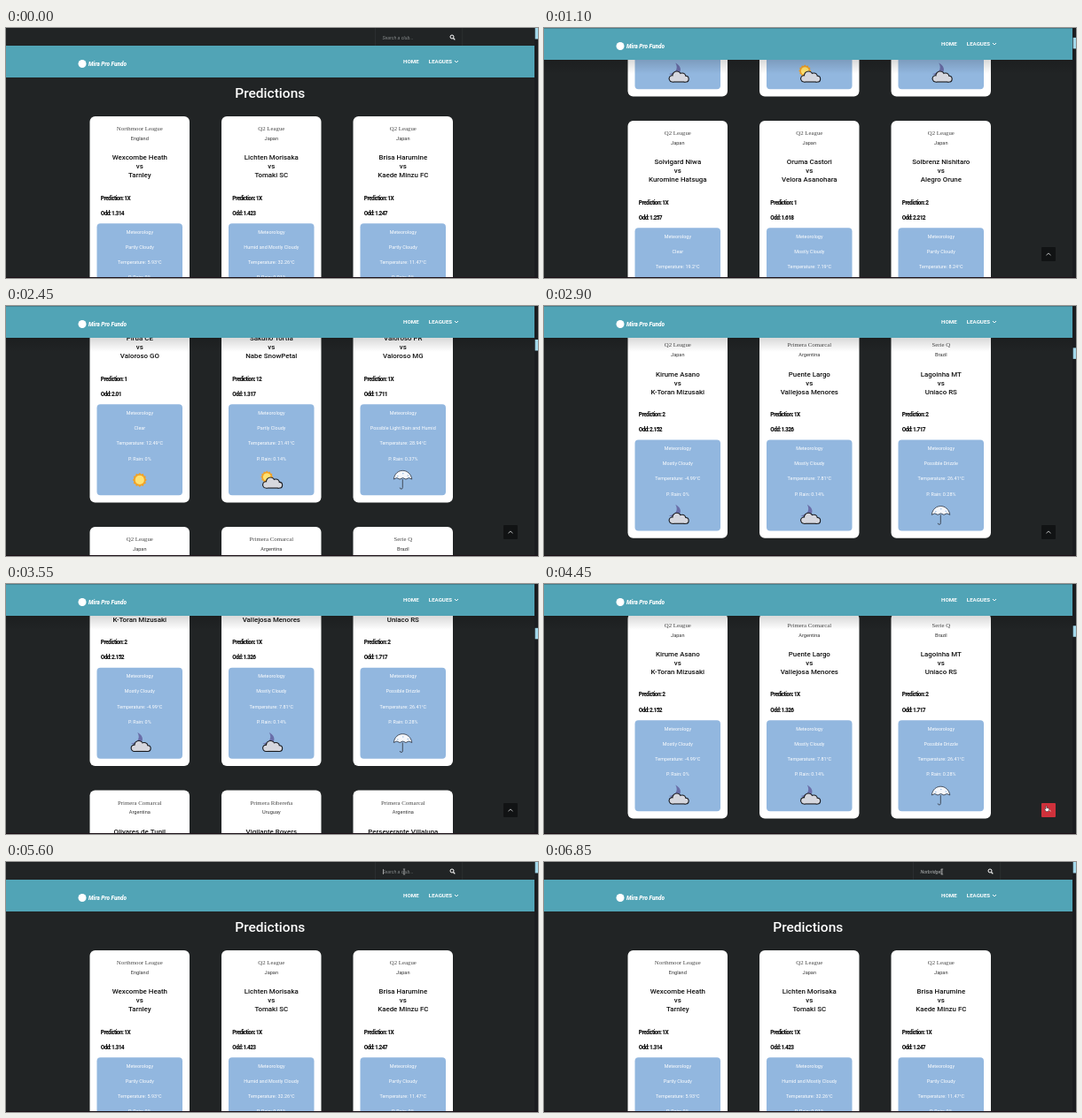
Animation, 600 px wide and 283 px high, one loop 6.9 s. Source, as an HTML page with a canvas:

```html
<!DOCTYPE html>
<html lang="en">
<head>
<meta charset="utf-8">
<title>Predictions</title>
<style>
html, body { margin: 0; width: 100%; height: 100%; overflow: hidden; background: #212425; }
canvas { display: block; width: 600px; height: 283px; }
</style>
</head>
<body>
<canvas id="stage"></canvas>
<script>
const W = 600, H = 283, LOOP = 6900;
const canvas = document.getElementById('stage');
const ratio = window.devicePixelRatio || 1;
canvas.width = W * ratio;
canvas.height = H * ratio;
const ctx = canvas.getContext('2d');

const SANS = 'Roboto, "Open Sans", sans-serif';
const SERIF = '"Liberation Serif", serif';
const TEAL = '#51a4b6', DARK = '#212425';
const QUERY = 'Norbridge';

// league | country | home | away | tip | odd | weather | temperature | rain | icon
const rows = [
  ['Northmoor League|England|Wexcombe Heath|Tarnley|1X|1.314|Partly Cloudy|5.93|0|moon',
   'Q2 League|Japan|Lichten Morisaka|Tomaki SC|1X|1.423|Humid and Mostly Cloudy|32.26|0.01|suncloud',
   'Q2 League|Japan|Brisa Harumine|Kaede Minzu FC|1X|1.247|Partly Cloudy|11.47|0|moon'],
  ['Q2 League|Japan|Solvigard Niwa|Kuromine Hatsuga|1X|1.257|Clear|19.2|0|sun',
   'Q2 League|Japan|Oruma Castori|Velora Asanohara|1|1.618|Mostly Cloudy|7.19|0|moon',
   'Q2 League|Japan|Solbrenz Nishitaro|Alegro Orune|2|2.212|Partly Cloudy|8.24|0|moon'],
  ['Serie Q|Brazil|Aurelio SP|Campanil RJ|1X|1.193|Overcast|26.77|0.21|overcast',
   'Q2 League|Japan|Tenora Mikasawa|Hoshime FC|1|1.519|Possible Drizzle|29.69|0.27|umbrella',
   'Serie Q|Brazil|Marolino SC|Verdejo BA|12|1.243|Mostly Cloudy|23.47|0|suncloud'],
  ['Serie Q|Brazil|Pirua CE|Valoroso GO|1|2.01|Clear|12.49|0|sun',
   'Q2 League|Japan|Sakuno Tortia|Nabe SnowPetal|12|1.317|Partly Cloudy|21.41|0.14|suncloud',
   'Serie Q|Brazil|Valoroso PR|Valoroso MG|1X|1.711|Possible Light Rain and Humid|28.94|0.37|umbrella'],
  ['Q2 League|Japan|Kirume Asano|K-Toran Mizusaki|2|2.152|Mostly Cloudy|-4.99|0|moon',
   'Primera Comarcal|Argentina|Puente Largo|Vallejosa Menores|1X|1.326|Mostly Cloudy|7.81|0.14|moon',
   'Serie Q|Brazil|Lagoinha MT|Uniaco RS|2|1.717|Possible Drizzle|26.41|0.28|umbrella'],
  ['Primera Comarcal|Argentina|Olivares de Tunil', 'Primera Ribereña|Uruguay|Vigilante Rovers',
   'Primera Comarcal|Argentina|Perseverante Villaluna']
].map(row => row.map(card => card.split('|')));

const clamp = (v, a = 0, b = 1) => Math.min(b, Math.max(a, v));
const lerp = (a, b, p) => a + (b - a) * p;
const ease = p => 0.5 - Math.cos(clamp(p) * Math.PI) / 2;

// time, scroll offset, speed
const scrollKeys = [[450, 0, 0], [1100, 254.5, .45], [1900, 656, .46], [2450, 889.5, .41], [3150, 1166.5, 0]];

function scrollAt(t) {
  if (t >= 3150) return 1166.5 * (1 - ease((t - 4306) / 1000));
  if (t <= 450) return 0;
  const i = scrollKeys.findIndex(k => k[0] >= t);
  const [t0, y0, v0] = scrollKeys[i - 1], [t1, y1, v1] = scrollKeys[i];
  const d = t1 - t0, p = (t - t0) / d, q = 1 - p;
  return q * q * ((1 + 2 * p) * y0 + p * d * v0) + p * p * ((3 - 2 * p) * y1 - q * d * v1);
}

// time, x, y; the pointer waits beyond the right edge
const path = [[3600, 606, 56], [4150, 568, 256], [4400, 568, 256], [4950, 471, 22], [5350, 449, 11]];

function pointerAt(t) {
  const i = path.findIndex(k => k[0] >= t);
  if (i < 1) return path[i < 0 ? path.length - 1 : 0].slice(1);
  const a = path[i - 1], b = path[i], p = ease((t - a[0]) / (b[0] - a[0]));
  return [lerp(a[1], b[1], p), lerp(a[2], b[2], p)];
}

function text(str, x, y, size, { color = '#fff', weight = 400, family = SANS, align = 'center', style = '', gap = 0 } = {}) {
  ctx.font = `${style} ${weight} ${size}px ${family}`;
  ctx.letterSpacing = gap + 'px';
  ctx.textAlign = align;
  ctx.fillStyle = color;
  ctx.fillText(str, x, y + size * .355);
}

function rect(x, y, w, h, color) {
  ctx.fillStyle = color;
  ctx.fillRect(x, y, w, h);
}

function box(x, y, w, h, r, color) {
  ctx.beginPath();
  ctx.roundRect(x, y, w, h, r);
  ctx.fillStyle = color;
  ctx.fill();
}

function disc(x, y, r, color) {
  ctx.beginPath();
  ctx.arc(x, y, r, 0, 7);
  ctx.fillStyle = color;
  ctx.fill();
}

function line(points, color, width) {
  ctx.beginPath();
  points.forEach(([x, y]) => ctx.lineTo(x, y));
  ctx.strokeStyle = color;
  ctx.lineWidth = width;
  ctx.stroke();
}

function cloud(x, y, scale = 1) {
  const lobes = [[-7.5, 2.3, 3.6], [-2.5, -1.2, 4.8], [3.5, 0, 4], [7.5, 2.6, 3.3]];
  const layer = (grow, color) => {
    lobes.forEach(([dx, dy, r]) => disc(x + dx * scale, y + dy * scale, r * scale + grow, color));
    rect(x - 7.5 * scale, y + 1 * scale - grow, 15 * scale, 4.9 * scale + 2 * grow, color);
  };
  layer(.6, '#17181c');
  layer(-.5, '#d6d7de');
}

function sun(x, y, r) {
  ctx.beginPath();
  for (let i = 0; i < 24; i++) {
    const a = i * Math.PI / 12, d = i % 2 ? r * .88 : r * 1.08;
    ctx.lineTo(x + d * Math.cos(a), y + d * Math.sin(a));
  }
  ctx.fillStyle = '#f2a226';
  ctx.fill();
  disc(x, y, r * .68, '#ffe272');
}

const icons = {
  sun: (x, y) => sun(x, y + .8, 7.5),
  moon(x, y) {
    ctx.beginPath();
    ctx.moveTo(x - 2.5, y - 11.5);
    ctx.bezierCurveTo(x + 8, y - 6, x + 3, y + 6, x - 10, y + 1);
    ctx.bezierCurveTo(x - 2, y, x + 1, y - 5, x - 2.5, y - 11.5);
    ctx.fillStyle = '#6a6ea8';
    ctx.fill();
    cloud(x + 1.5, y + 4);
  },
  suncloud(x, y) {
    sun(x - 5, y - 2.5, 6.5);
    cloud(x + 1.5, y + 4);
  },
  overcast(x, y) {
    cloud(x + 1, y - 4.5, .8);
    sun(x - 5.5, y - 2.5, 6.2);
    cloud(x + 1.5, y + 5);
  },
  umbrella(x, y) {
    ctx.beginPath();
    ctx.moveTo(x - .5, y);
    ctx.lineTo(x - .5, y + 9.5);
    ctx.arc(x - 2, y + 9.5, 1.5, 0, Math.PI);
    ctx.strokeStyle = '#39404c';
    ctx.lineWidth = .9;
    ctx.stroke();
    ctx.beginPath();
    ctx.moveTo(x - 10.5, y);
    ctx.bezierCurveTo(x - 9, y - 13, x + 8, y - 13, x + 10, y);
    for (let i = 0; i < 3; i++) {
      const end = x + 10 - (i + 1) * 20.5 / 3;
      ctx.quadraticCurveTo(end + 3.4, y - 3, end, y);
    }
    ctx.fillStyle = '#f5f7fb';
    ctx.fill();
    ctx.strokeStyle = '#2b3340';
    ctx.lineWidth = .8;
    ctx.stroke();
    [[-6, -3.5], [0, -6.5], [5.5, -4]].forEach(([dx, dy]) => disc(x + dx, y + dy, .8, '#9cbfe6'));
  }
};

function drawCard(card, x, y) {
  const [league, country, home, away, tip, odd, sky, temp, rain, icon] = card;
  const mid = x + 56.3;
  box(x, y, 112.5, 232.5, 6, '#fff');
  text(league, mid, y + 13.7, 6.8, { color: '#484848', family: SERIF });
  text(country, mid, y + 24.7, 5.6, { color: '#333' });
  const team = { color: '#111', weight: 500 };
  text(home, mid, y + 46.4, 7.9, team);
  if (!away) return;
  text('vs', mid, y + 56.6, 7.9, team);
  text(away, mid, y + 66.6, 7.9, team);
  const bet = { color: '#161616', weight: 900, align: 'left', gap: -.62 };
  text('Prediction: ' + tip, x + 12.3, y + 92.2, 6.5, bet);
  text('Odd: ' + odd, x + 12.3, y + 109.6, 6.5, bet);
  box(x + 8, y + 121.2, 96.5, 103, 4, '#92b7df');
  ['Meteorology', sky, `Temperature: ${temp}°C`, `P. Rain: ${rain}%`]
    .forEach((s, i) => text(s, mid, y + 130.6 + i * 17.3, 5.45));
  icons[icon](mid, y + 206);
}

function drawSearch(t, y) {
  rect(416, y, .7, 20, '#303435');
  rect(514.5, y, .7, 20, '#303435');
  const count = clamp(Math.floor((t - 5700) / 115), 0, QUERY.length);
  const opts = { align: 'left', style: 'italic', color: count ? '#b4b7b8' : '#85898a' };
  text(count ? QUERY.slice(0, count) : 'Search a club...', 424.5, y + 10.7, 5.3, opts);
  if (t > 5400) {
    const end = 425 + (count ? ctx.measureText(QUERY.slice(0, count)).width : 0);
    rect(end, y + 8, .6, 6, '#ddd');
  }
  ctx.beginPath();
  ctx.arc(503, y + 10, 2, 0, 7);
  ctx.strokeStyle = '#fff';
  ctx.lineWidth = 1;
  ctx.stroke();
  line([[504.5, y + 11.5], [506.3, y + 13.3]], '#fff', 1.2);
}

function drawNav(y, hover) {
  if (y === 0) {
    const shade = ctx.createLinearGradient(0, 36, 0, 52);
    shade.addColorStop(0, 'rgba(0,0,0,.15)');
    shade.addColorStop(1, 'rgba(0,0,0,0)');
    rect(0, 36, 596, 16, shade);
  }
  rect(0, y, 596, 36, TEAL);
  disc(86, y + 20.5, 4.5, '#fff');
  text('Mira Pro Fundo', 93, y + 21, 6.4, { weight: 800, style: 'italic', align: 'left' });
  const item = { weight: 700, align: 'left' };
  text('HOME', 448, y + 18, 6.25, { ...item, color: hover ? '#172229' : '#fff' });
  text('LEAGUES', 476.8, y + 18, 6.15, item);
  line([[506, y + 17], [508, y + 19], [510, y + 17]], '#fff', 1);
  if (hover) rect(443.5, y + 34.2, 26.5, 1.5, '#fff');
}

function drawTopButton(s, red) {
  ctx.globalAlpha = clamp((s - 100) / 60);
  box(561, 248, 16, 16, 1, red ? '#cf313b' : '#111314');
  line([[566.5, 257.2], [569, 254.9], [571.5, 257.2]], red ? '#f4dfe0' : '#b4b6b7', 1);
  ctx.globalAlpha = 1;
}

function drawPointer(x, y, kind) {
  if (kind === 'text') {
    line([[x - 1.2, y - 3], [x + 1.2, y - 3]], '#ccc', .6);
    line([[x, y - 3], [x, y + 3]], '#ccc', .6);
    line([[x - 1.2, y + 3], [x + 1.2, y + 3]], '#ccc', .6);
    return;
  }
  const shape = kind === 'hand'
    ? [[0, 0], [1, 0], [1, 2.4], [3.6, 3], [3.6, 5], [2.8, 6.4], [.2, 6.4], [-1.5, 3.8], [-.8, 3.2], [0, 4]]
    : [[0, 0], [0, 6.5], [1.5, 5.2], [2.5, 7.3], [3.4, 6.9], [2.5, 4.9], [4.5, 4.7]];
  ctx.beginPath();
  shape.forEach(([dx, dy]) => ctx.lineTo(x + dx, y + dy));
  ctx.closePath();
  ctx.fillStyle = '#fff';
  ctx.fill();
  ctx.strokeStyle = '#222';
  ctx.lineWidth = .5;
  ctx.stroke();
}

function draw(t) {
  const s = scrollAt(t);
  const navY = Math.max(0, 20 - s);
  const [px, py] = pointerAt(t);
  const onHome = px > 443 && px < 474 && py > navY && py < navY + 36;
  const onButton = px > 560 && px < 578 && py > 247 && py < 265;
  ctx.setTransform(ratio, 0, 0, ratio, 0, 0);
  rect(0, 0, W, H, DARK);
  text('Predictions', 297.8, 73.5 - s, 15.5, { weight: 500 });
  rows.forEach((row, r) => {
    const y = 100 + r * 260 - s;
    if (y < H && y > -240) row.forEach((card, c) => drawCard(card, 94.5 + c * 148.5, y));
  });
  if (s < 20) drawSearch(t, -s);
  drawNav(navY, onHome);
  drawTopButton(s, onButton || t > 4150);
  rect(596, 0, 4, H, '#1b1d20');
  rect(596.7, s * .0427, 3.3, 12.5, '#a3d8ea');
  rect(0, 0, 596, .6, 'rgba(20,18,28,.4)');
  rect(0, 282, W, 1, '#1b1017');
  const overText = px > 416 && px < 497 && py < navY;
  drawPointer(px, py, overText ? 'text' : onHome || onButton ? 'hand' : 'arrow');
}

const start = performance.now();
function tick() {
  draw((performance.now() - start) % LOOP);
  requestAnimationFrame(tick);
}
tick();
</script>
</body>
</html>
```
